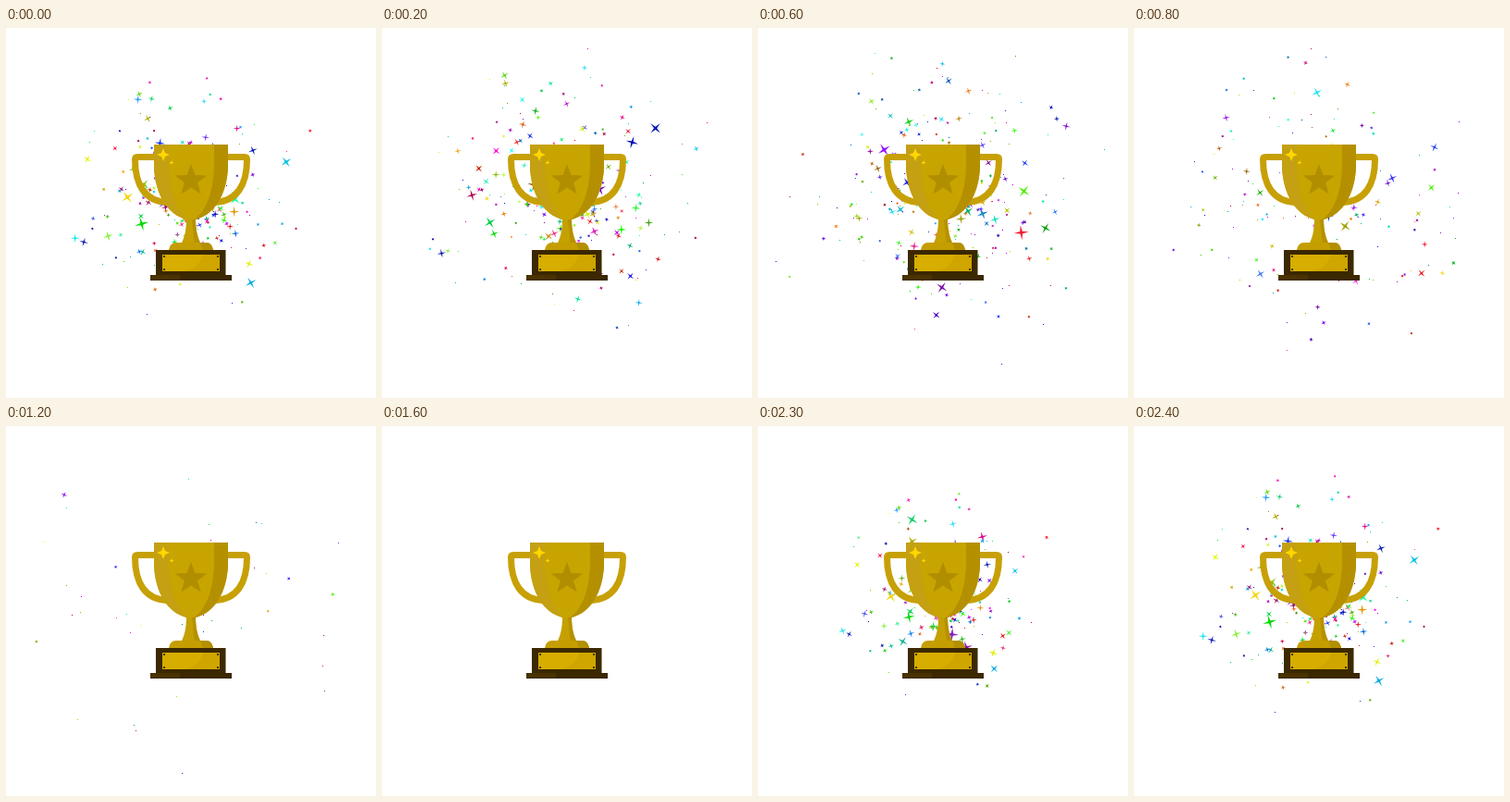
An HTML page with a canvas for the animation above (2.5 s loop, 400 px wide and 400 px high).

```html
<!DOCTYPE html>
<html lang="en">
<head>
<meta charset="utf-8">
<title>Trophy</title>
<style>
html, body { margin: 0; width: 100%; height: 100%; overflow: hidden; background: #fff; }
canvas { display: block; width: 400px; height: 400px; }
</style>
</head>
<body>
<canvas id="stage" width="400" height="400"></canvas>
<script>
const ctx = document.getElementById('stage').getContext('2d');
const TAU = Math.PI * 2;
const CENTER = { x: 200, y: 197 };
const STEP = 100, STEPS = 25, FIRST = 18; // the burst starts at step FIRST
const COUNT = 480;

let seed = 7219;
function rand(min = 0, max = 1, power = 1) {
  seed = (seed * 16807) % 2147483647;
  return min + (max - min) * Math.pow(seed / 2147483647, power);
}

function makeFlake() {
  const dir = rand(0, TAU), reach = rand(25, 205);
  return {
    dx: Math.cos(dir) * reach,
    dy: Math.sin(dir) * reach,
    color: `hsl(${rand(0, 360)} ${rand(80, 100)}% ${rand(32, 62)}%)`,
    birth: rand(30, 980, 1.1),
    life: rand(500, 1200, 1.5),
    size: rand(1.2, 9, 1.5),
    turn: rand(0, TAU),
    spin: rand(-0.004, 0.004),
    pulse: rand(0.008, 0.025)
  };
}

const flakes = Array.from({ length: COUNT }, makeFlake);

// Fast start, then drag; a slight lift gives way to gravity.
const spread = age => 1 - Math.exp(-Math.pow(age / 450, 1.3));
const fall = age => 30 * (age / 1000) ** 2 - 40 * spread(age);

function star(x, y, points, outer, inner, turn) {
  ctx.beginPath();
  for (let i = 0; i < points * 2; i++) {
    const r = i % 2 ? inner : outer;
    const a = turn + i * Math.PI / points;
    ctx.lineTo(x + r * Math.cos(a), y + r * Math.sin(a));
  }
  ctx.closePath();
  ctx.fill();
}

function drawFlake(f, t) {
  const age = t - f.birth;
  if (age <= 0 || age >= f.life) return;
  const grow = Math.min(1, 0.5 + age / 300);
  const shrink = 1 - (age / f.life) ** 3;
  const twinkle = 0.75 + 0.25 * Math.cos(age * f.pulse);
  const r = f.size * grow * shrink * twinkle;
  const x = CENTER.x + f.dx * spread(age);
  const y = CENTER.y + f.dy * spread(age) + fall(age);
  ctx.fillStyle = f.color;
  if (r < 1.3) ctx.fillRect(Math.round(x), Math.round(y), 1, 1);
  else star(x, y, 4, r, Math.max(0.9, r * 0.22), f.turn + f.spin * age);
}

function fillPath(d, color) {
  ctx.fillStyle = color;
  ctx.fill(new Path2D(d));
}

function box(x, y, w, h, color) {
  ctx.fillStyle = color;
  ctx.fillRect(x, y, w, h);
}

const bowl = new Path2D('M160 126H240V150C239 180 225 202 205 207H195C175 202 161 180 160 150Z');
const handle = new Path2D('M162 139.5H142Q139.5 139.5 139.5 142C139.5 171 151 187 174 188.5');

function drawHandles() {
  ctx.strokeStyle = '#c7a006';
  ctx.lineWidth = 7;
  for (const side of [1, -1]) {
    ctx.save();
    ctx.translate(200, 0);
    ctx.scale(side, 1);
    ctx.translate(-200, 0);
    ctx.stroke(handle);
    ctx.restore();
  }
}

function drawBowl() {
  ctx.save();
  ctx.clip(bowl);
  box(160, 126, 80, 82, '#c8a400');
  fillPath('M160 126H176V150C177 177 184 198 198 208H160Z', '#c4a012');
  fillPath('M225 126H240V208H202C217 198 224 177 225 150Z', '#b49000');
  ctx.restore();
  ctx.fillStyle = '#b08e00';
  star(200, 165, 5, 18, 7.4, -Math.PI / 2);
  ctx.fillStyle = '#ffd600';
  star(170, 137, 4, 7, 3, 0);
  star(179, 145.5, 4, 2.5, 1.1, 0);
}

function drawBase() {
  fillPath('M195 206H205C205 218 207 227 211 234H189C193 227 195 218 195 206Z', '#c5a000');
  fillPath('M201 207H205C205 218 207 227 211 234H204Z', '#b59100');
  fillPath('M176 240C177 235 179 232 184 232H216C221 232 223 235 224 240Z', '#c49e00');
  fillPath('M210 232H216C221 232 223 235 224 240H213Z', '#b48f00');
  box(162, 240, 75.5, 27, '#3b2800');
  box(156, 267, 88, 6, '#3b2800');
  box(156, 267, 32, 5, '#493200');
  box(169, 245, 62, 18, '#d7ae00');
  fillPath('M213 245H231V263H194C204 260 211 254 213 245Z', '#cfa600');
  for (const x of [171, 229])
    for (const y of [247, 261]) box(x - 1, y - 1, 2, 2, '#4a3500');
}

function draw(ms) {
  const step = Math.floor(ms / STEP) % STEPS;
  // The last step holds the same picture as the first.
  const t = (step < FIRST ? step + STEPS - 1 - FIRST : step - FIRST) * STEP;
  box(0, 0, 400, 400, '#fff');
  for (const f of flakes) drawFlake(f, t);
  drawHandles();
  drawBase();
  drawBowl();
}

const start = performance.now();
function tick() {
  draw(performance.now() - start);
  requestAnimationFrame(tick);
}
tick();
</script>
</body>
</html>
```
